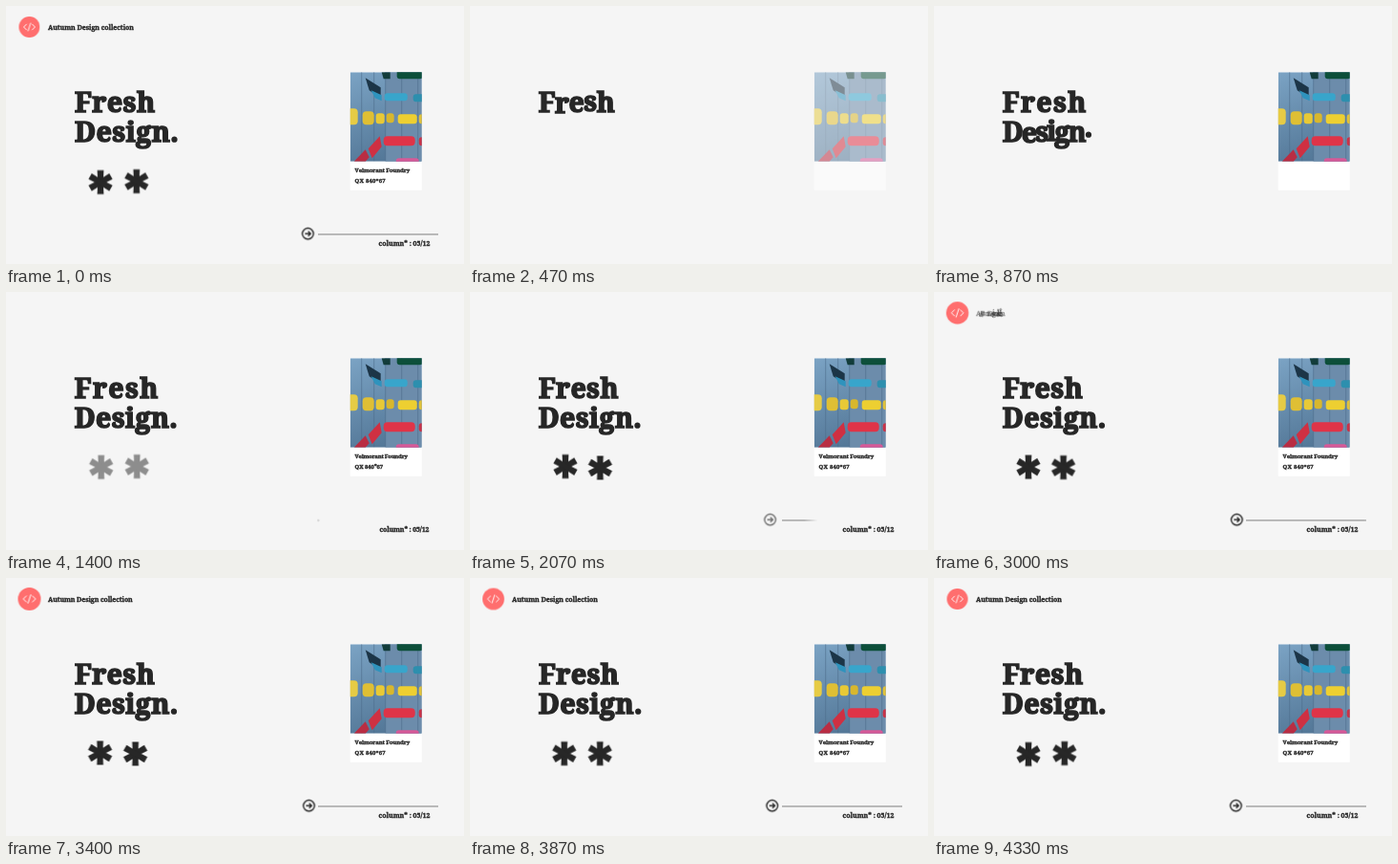
An HTML page for the animation above (4470 ms loop, 480 by 270 pixels).

```html
<!DOCTYPE html>
<html lang="en">
<head>
<meta charset="utf-8">
<title>Fresh Design</title>
<style>
@property --t { syntax: '<number>'; inherits: true; initial-value: 0; }
@property --edge { syntax: '<length>'; inherits: false; initial-value: 145px; }

html, body { margin: 0; width: 100%; height: 100%; overflow: hidden; background: #f5f5f5; }

/* --t is the loop time in ms; --full is 1 during the opening still */
body {
  position: relative;
  color: #272727;
  animation: clock 4470ms linear infinite;
  --full: clamp(0, (70 - var(--t)) * 99, 1);
}
@keyframes clock { from { --t: 0; } to { --t: 4470; } }

svg { position: absolute; left: 0; top: 0; width: 480px; height: 270px; }

/* Text: letters spread out from a stack */
.line {
  position: absolute;
  white-space: pre;
  line-height: 0;
  font-family: 'Noto Serif', serif;
  font-weight: 700;
  font-size: 7px;
  -webkit-text-stroke: .35px currentColor;
  --loose: 0;
  --mid: 0;
}
.line span {
  display: inline-block;
  --p: max(var(--full), clamp(0, (var(--t) - var(--start)) / 600, 1));
  --q: (1 - var(--p));
  --n: (var(--i) - var(--mid));
  opacity: clamp(0, var(--p) * 5, 1);
  transform: translate(
    calc(var(--n) * var(--q) * var(--q) * var(--q) * -.48em + var(--i) * var(--loose) * 1px),
    calc(var(--y) * var(--q) * var(--q) * 1em));
}
.head {
  left: 71.8px;
  font-size: 28.6px;
  letter-spacing: .35px;
  -webkit-text-stroke-width: 1.6px;
  transform-origin: 0 0;
  transform: scale(calc(1 + .008 * max(var(--full), clamp(0, (var(--t) - 2000) / 2400, 1))));
  filter: blur(calc(var(--full) * .7px));
}
#fresh { top: 100.3px; --start: 180; --loose: clamp(0, (1700 - var(--t)) * 99, 1) * (1 - var(--full)); }
#design { top: 130.7px; --start: 600; }
#name { left: 365.6px; top: 172.2px; font-size: 6px; letter-spacing: -.15px; --start: 1020; }
#code { left: 365.6px; top: 182.6px; font-size: 6px; letter-spacing: .2px; --start: 1090; }
#column { right: calc(100% - 444.3px); top: 248.7px; --start: 1000; --mid: 7; }
#title { left: 44px; top: 23.3px; letter-spacing: -.07px; --start: 2950; }

/* Shapes */
.card, .stars, .arrow, .rule, .disc { animation: 4470ms linear infinite; }

.card { animation-name: card; }
@keyframes card {
  0%, 1.56% { opacity: 1; }
  1.57%, 4% { opacity: 0; }
  16%, 100% { opacity: 1; }
}

.stars { animation-name: stars; filter: blur(calc(var(--full) * .7px)); }
@keyframes stars {
  0%, 1.56% { opacity: 1; }
  1.57%, 25.7% { opacity: 0; }
  31.3% { opacity: .5; }
  38%, 100% { opacity: 1; }
}
.star { animation: left 4470ms ease-in-out infinite; }
.star.b { animation-name: right; }
@keyframes left {
  0%, 96.9%, 100% { transform: translate(99px, 184.4px); }
  31.3% { transform: translate(99.7px, 183.3px); }
  46.3% { transform: translate(100px, 182.6px); }
  58.2% { transform: translate(99.2px, 183.3px); }
  76% { transform: translate(98.6px, 183px); }
}
@keyframes right {
  0%, 96.9%, 100% { transform: translate(136.8px, 183.5px); }
  31.3% { transform: translate(137.2px, 182.6px); }
  46.3% { transform: translate(136.4px, 184px); }
  58.2% { transform: translate(135.6px, 183.2px); }
  76% { transform: translate(135.6px, 184px); }
}

.arrow { animation-name: arrow; animation-timing-function: ease-out; }
@keyframes arrow {
  0%, 1.56% { opacity: 1; transform: translate(316.4px, 238.3px); }
  1.57%, 30% { opacity: 0; transform: translate(328px, 239px) scale(.1); }
  31.3% { opacity: .45; transform: translate(327.4px, 239px) scale(.17); }
  46.3% { opacity: .65; transform: translate(314.5px, 238.3px); }
  58.2% { opacity: 1; transform: translate(317.1px, 238.3px); }
  76% { opacity: 1; transform: translate(317.5px, 238.3px); }
  93.9%, 100% { opacity: 1; transform: translate(316.4px, 238.3px); }
}

.rule {
  position: absolute;
  left: 326.5px; top: 238px;
  width: 126px; height: 2px;
  background: #b9b9b9;
  -webkit-mask-image: linear-gradient(90deg, #000 calc(var(--edge) - 14px), transparent var(--edge));
  mask-image: linear-gradient(90deg, #000 calc(var(--edge) - 14px), transparent var(--edge));
  animation-name: rule;
}
@keyframes rule {
  0%, 1.56% { --edge: 145px; }
  1.57%, 39.2% { --edge: 0px; }
  46.3% { --edge: 37px; }
  58.2% { --edge: 124px; }
  59.7% { --edge: 126px; }
  71.6%, 100% { --edge: 145px; }
}

.disc { animation-name: disc; }
@keyframes disc {
  0%, 1.56% { transform: translate(24.5px, 22px); }
  1.57%, 56.8% { transform: translate(24.5px, 21.8px) scale(0); }
  58.2% { transform: translate(24.5px, 21.8px) scale(.18); }
  59.7% { transform: translate(24.5px, 21.8px) scale(.52); }
  64% { transform: translate(24.5px, 21.9px) scale(1.06); }
  76% { transform: translate(24.5px, 21.9px) scale(1.09); }
  94%, 100% { transform: translate(24.5px, 22px); }
}
</style>
</head>
<body>
<svg viewBox="0 0 480 270">
  <defs>
    <path id="arm" d="M-2.8 0L-3.4-12.6H3.4L2.8 0L3.4 12.6H-3.4Z"/>
    <g id="star">
      <use href="#arm"/>
      <use href="#arm" transform="rotate(60)"/>
      <use href="#arm" transform="rotate(120)"/>
    </g>
    <linearGradient id="wall" x2=".3" y2="1">
      <stop offset="0" stop-color="#7ba3c4"/>
      <stop offset="1" stop-color="#557999"/>
    </linearGradient>
    <clipPath id="crop"><path d="M0 0H75V93.5H0Z"/></clipPath>
  </defs>

  <g class="card">
    <path fill="#fff" d="M360.7 69H435.8V192.7H360.7Z"/>
    <g transform="translate(360.7 69.2)" clip-path="url(#crop)">
      <path fill="url(#wall)" d="M0 0H75V93.5H0Z"/>
      <path fill="#6c8cab" d="M37 0H75V93.5H37Z"/>
      <path stroke="#4e6d8b" stroke-width=".6" d="M12 0V93M25 0V93M37 0V93M54 0V93M71 0V93"/>
      <path fill="#1c3547" d="M16 6L32 16V27L20 19Z"/>
      <path fill="#123c3a" d="M33 0H42V7H35Z"/>
      <rect x="49" y="-4" width="27" height="11" rx="3" fill="#0d4f3a"/>
      <path fill="#2f93bd" d="M22 19L33 24V30L26 27Z"/>
      <rect x="36" y="22" width="24" height="8" rx="3" fill="#38a5cb"/>
      <rect x="66" y="23" width="12" height="8" rx="3" fill="#2d8fae"/>
      <rect x="-4" y="38" width="12" height="17" rx="4" fill="#e6cb45"/>
      <rect x="13" y="41" width="12" height="14" rx="4" fill="#dfbf34"/>
      <rect x="27" y="43" width="9" height="11" rx="3" fill="#e8c936"/>
      <rect x="38" y="43" width="8" height="10" rx="3" fill="#d8b72d"/>
      <rect x="50" y="44" width="20" height="10" rx="3" fill="#edcf31"/>
      <rect x="72" y="44" width="8" height="10" rx="3" fill="#dfc13a"/>
      <path fill="#cf3042" d="M19 80L31 67L33 78L23 90Z"/>
      <path fill="#b92d43" d="M4 93.5L16 81L20 89L16 93.5Z"/>
      <rect x="35" y="67" width="33" height="10" rx="4" fill="#df3448"/>
      <rect x="72" y="68" width="8" height="9" rx="3" fill="#c93247"/>
      <rect x="48" y="90" width="24" height="8" rx="3" fill="#d65a98"/>
    </g>
  </g>

  <g class="stars" fill="#272727">
    <use class="star" href="#star"/>
    <use class="star b" href="#star"/>
  </g>

  <g class="arrow" fill="none" stroke="#272727" stroke-width="1.4">
    <circle r="5.8"/>
    <path d="M-3 0H2.6M.3-2.5L2.8 0L.3 2.5"/>
  </g>

  <g class="disc">
    <circle r="11" fill="#ff6e6e"/>
    <path fill="none" stroke="#fff" stroke-width=".9" stroke-linecap="round" stroke-linejoin="round"
      d="M-3-2.9L-5.9 0L-3 2.9M3-2.9L5.9 0L3 2.9M1.3-4L-1.3 4"/>
  </g>
</svg>

<div class="rule"></div>
<div class="line head" id="fresh">Fresh</div>
<div class="line head" id="design">Design.</div>
<div class="line" id="name">Velmorant Foundry</div>
<div class="line" id="code">QX 840*67</div>
<div class="line" id="column">column* : 05/12</div>
<div class="line" id="title">Autumn Design collection</div>

<script>
const lift = [0, .15, -.05, -.15, .05, 0, -.55];

for (const line of document.querySelectorAll('.line')) {
  const letters = [...line.textContent].map((char, i) => {
    const span = document.createElement('span');
    span.textContent = char;
    span.style.setProperty('--i', i);
    span.style.setProperty('--y', lift[i % lift.length]);
    return span;
  });
  line.replaceChildren(...letters);
}
</script>
</body>
</html>
```
